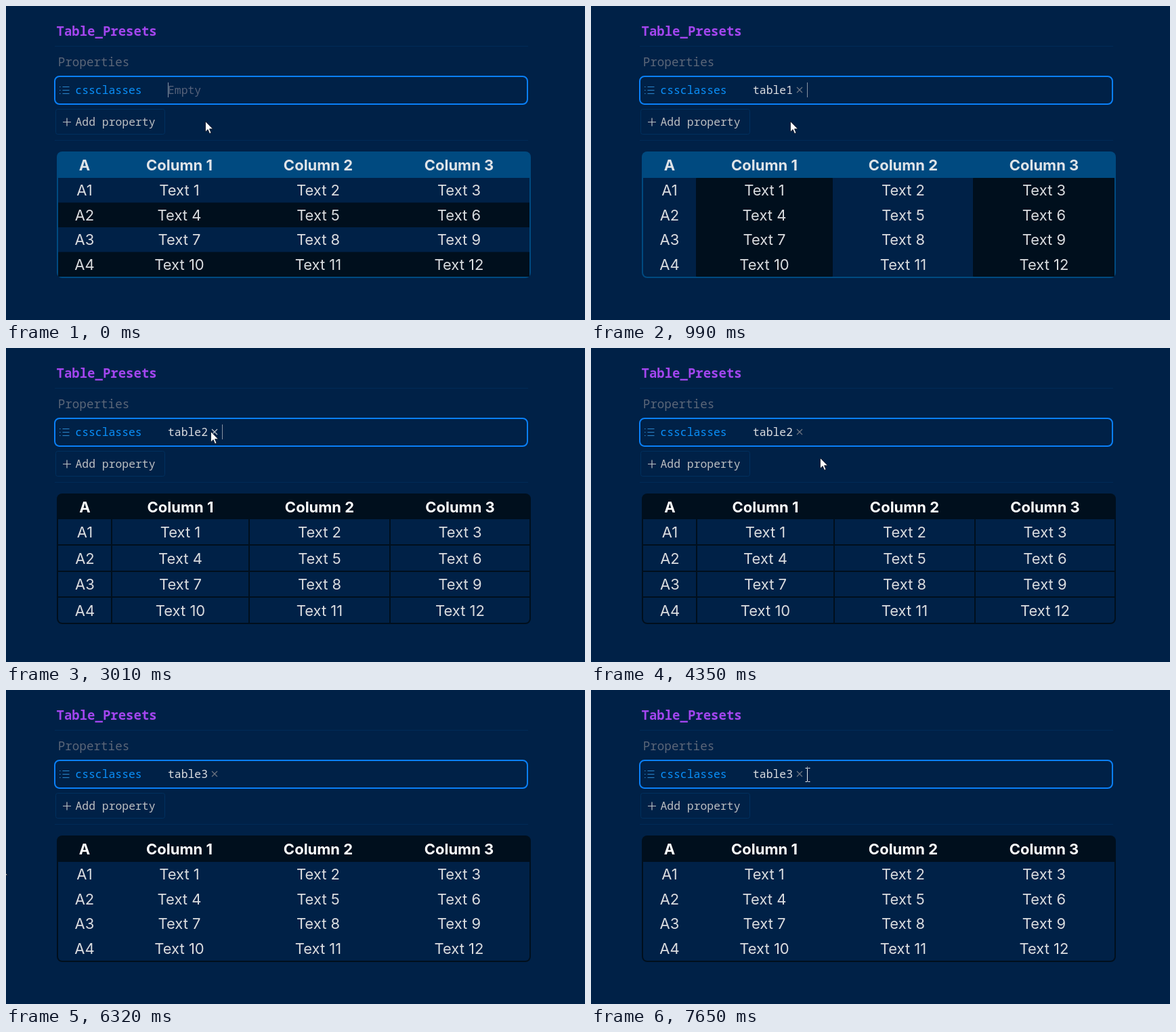
Write an HTML page that moves like this. It is 855 px wide and 464 px high and loops after 8 s.

```html
<!DOCTYPE html>
<html lang="en">
<head>
<meta charset="utf-8">
<title>Table presets</title>
<style>
  html, body { margin: 0; width: 100%; height: 100%; overflow: hidden; background: #002147; }
  svg { display: block; }
  text { font: 16.4px "Noto Sans Mono", monospace; white-space: pre; }
  .cell { font: 22px Inter, sans-serif; text-anchor: middle; fill: #dadcdf; }
  .head { font-weight: 700; }
  .line { fill: none; stroke-width: 1.2; }
</style>
</head>
<body>
<svg width="855" height="464" viewBox="0 0 855 464">
  <text x="74.5" y="44" style="font-size:19px;font-weight:700" fill="#a346ef">Table_Presets</text>
  <path d="M72 59.5H771M72 198.5H771" stroke="#002b57"/>
  <text x="76.7" y="89" style="font-size:17.6px" fill="#5b6678">Properties</text>

  <rect x="72" y="104" width="698" height="41" rx="7" fill="none" stroke="#0a80f8" stroke-width="2"/>
  <path class="line" d="M83.5 119.5h10M83.5 124.5h10M83.5 129.5h10M79 119.5h1.5M79 124.5h1.5M79 129.5h1.5" stroke="#2b86cb"/>
  <text x="102.3" y="130" fill="#0a91fb">cssclasses</text>
  <text id="value" x="239" y="130"></text>
  <path id="remove" class="line" d="M304 120l8 8m0-8l-8 8"/>
  <rect id="caret" y="113" width="1" height="22" fill="#8793a3"/>

  <rect x="73.5" y="152.5" width="161" height="37" rx="3" fill="none" stroke="#00305f"/>
  <path class="line" d="M84 171.5h12M90 165.5v12" stroke="#bdbfc2"/>
  <text x="102.5" y="177" fill="#bdbfc2">Add property</text>

  <g id="tables"></g>
  <rect id="outline" x="74.5" y="214.5" width="701" height="188" rx="8" fill="none" stroke="#00305f"/>

  <path id="arrow" d="M.5 .5V16l3.6-3.4 2.5 5.9 2.4-1-2.5-5.8h5z" fill="#fff" stroke="#06101e" stroke-width=".8"/>
  <path id="ibeam" d="M-3.5 .5h3m1 0h3M-3.5 20.5h3m1 0h3M-.5 1v19" fill="none" stroke="#e4e8ec"/>
</svg>
<script>
const $ = id => document.getElementById(id);
const BG = '#002147', BLUE = '#004a80', DARK = '#000f1d';
const EDGES = [77, 155, 357, 564, 773];
const LOOP = 8000;

const rect = (x, y, w, h, fill, rx = 0) =>
  `<rect x="${x}" y="${y}" width="${w}" height="${h}" rx="${rx}" fill="${fill}"/>`;

function table({ frame, headFill, stripe, grid }) {
  const top = grid ? 253 : 254, pitch = grid ? 38.5 : 36.5;
  const bottom = grid ? 406 : 400;
  const centers = grid ? [116.5, 257.5, 463, 670.5] : [116, 256, 461, 669];
  let out = rect(75, 215, 700, bottom - 213, frame, 8) + rect(77, top, 696, bottom - top, BG, 6)
    + rect(77, top, 696, 10, BG);
  if (stripe === 'rows')
    for (const r of [1, 3]) out += rect(77, top + r * pitch, 696, pitch, DARK, r === 3 ? 1 : 0);
  if (stripe === 'columns')
    for (const c of [1, 3]) out += rect(EDGES[c], top, EDGES[c + 1] - EDGES[c], bottom - top, DARK, 1);
  if (grid) {
    for (const x of [155, 358, 566]) out += rect(x, top, 2, bottom - top, frame);
    for (const y of [290, 329, 367]) out += rect(77, y, 696, 2, frame);
  }
  centers.forEach((x, c) => {
    out += `<text class="cell head" x="${x}" y="243" style="fill:${headFill}">${c ? 'Column ' + c : 'A'}</text>`;
    for (let r = 0; r < 4; r++)
      out += `<text class="cell" x="${x}" y="${280 + r * pitch}">${c ? 'Text ' + (r * 3 + c) : 'A' + (r + 1)}</text>`;
  });
  return `<g>${out}</g>`;
}

$('tables').innerHTML = [
  { frame: BLUE, headFill: '#e0e4e8', stripe: 'rows' },
  { frame: BLUE, headFill: '#e0e4e8', stripe: 'columns' },
  { frame: DARK, headFill: '#fff', grid: true },
  { frame: DARK, headFill: '#fff' },
].map(table).join('');

// [start time, text, preset]
const values = [[0, '', 0], [660, 'table', 0], [990, 'table1', 1], [3010, 'table2', 2], [6320, 'table3', 3]];
// The caret starts visible and flips at each of these times.
const blinks = [1330, 2000, 2340, 3010, 3340, 4010, 4350, 5010, 5350, 5990, 6320, 6660, 7320, 7650];
// [start time, shape, x, y]
const pointers = [
  [0, 'arrow', 294, 170], [2670, 'arrow', 293, 157], [3010, 'arrow', 302, 123],
  [4350, 'arrow', 338, 162], [4680, 'arrow', 343, 173], [5350, 'arrow', 333, 147],
  [5660, 'ibeam', 318, 124], [5990, 'arrow', 304, 130], [6320, 'arrow', -9, 262],
  [6660, 'arrow', 190, 238], [6990, 'arrow', 307, 132], [7320, 'ibeam', 321, 115],
  [7650, 'ibeam', 320, 115],
];

const at = (list, t) => list.findLast(item => item[0] <= t);
const show = (el, on) => el.style.display = on ? '' : 'none';

function draw(now) {
  const t = now % LOOP;
  const [, text, preset] = at(values, t);
  const [, shape, x, y] = at(pointers, t);

  $('value').textContent = text || 'Empty';
  $('value').setAttribute('fill', text ? '#dcdee1' : '#56627a');
  [...$('tables').children].forEach((el, i) => show(el, i === preset));

  show($('caret'), blinks.filter(b => b <= t).length % 2 === 0);
  $('caret').setAttribute('x', preset ? 319 : text ? 287 : 239);

  const overRemove = shape === 'arrow' && x > 300 && x < 314 && y > 114 && y < 134;
  show($('remove'), preset);
  $('remove').setAttribute('stroke', overRemove ? '#c3c8ce' : '#6d7682');

  show($('outline'), shape === 'arrow' && x > 75 && y > 215);
  for (const id of ['arrow', 'ibeam']) show($(id), id === shape);
  $(shape).setAttribute('transform', `translate(${x} ${y})`);
  requestAnimationFrame(draw);
}
draw(0);
</script>
</body>
</html>
```
